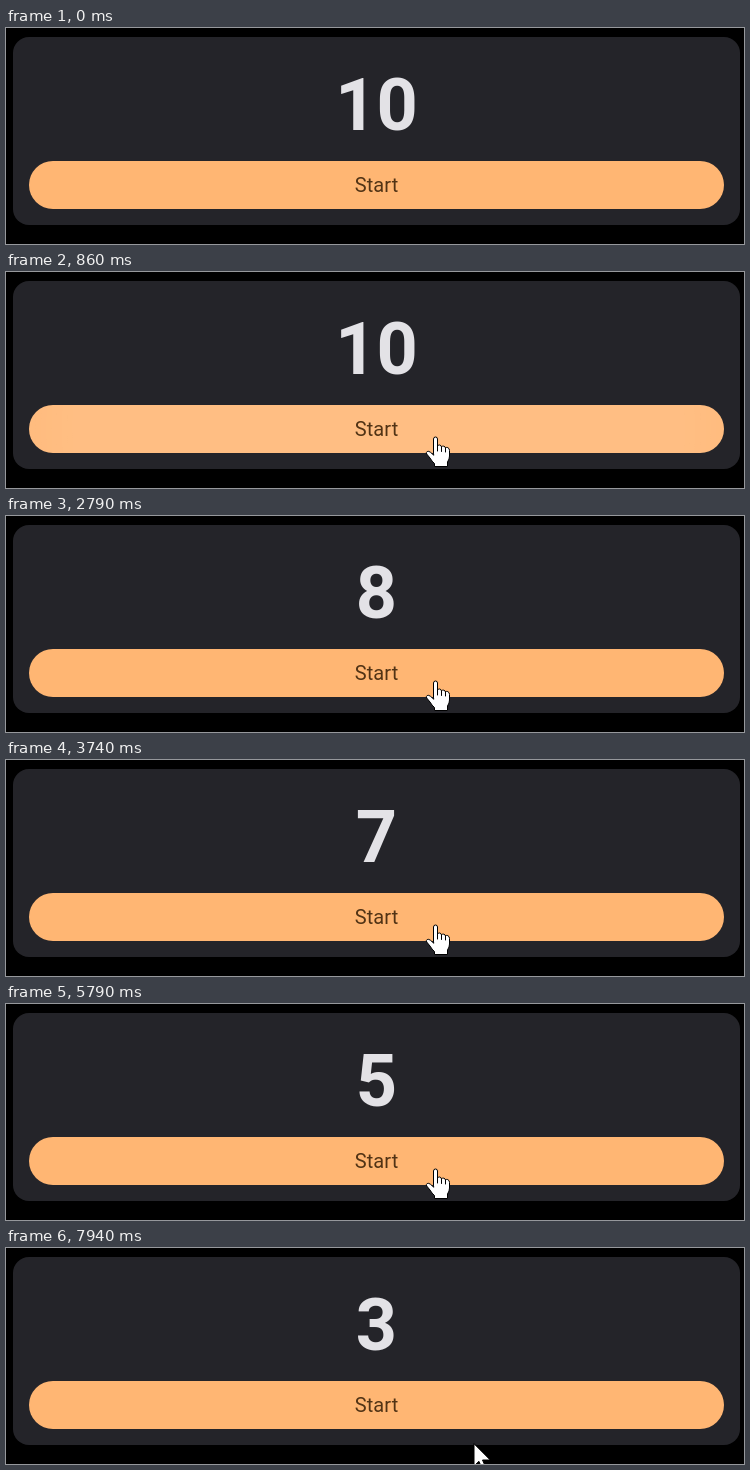
Write an HTML page that moves like this. It is 738x216 px and loops after 8000 ms.

```html
<!DOCTYPE html>
<html lang="en">
<head>
<meta charset="utf-8">
<title>Countdown</title>
<style>
  html, body { margin: 0; width: 100%; height: 100%; overflow: hidden; background: #000; }
  .stage { position: relative; width: 738px; height: 216px; overflow: hidden; font-family: Roboto, sans-serif; }
  .stage * { box-sizing: border-box; }
  .card { position: absolute; left: 7px; top: 9px; width: 727px; height: 188px; border-radius: 16px; background: #242429; }

  .count { position: absolute; left: 270.5px; top: 38px; width: 200px; height: 80px; overflow: hidden; }
  .digits { font-size: 72px; font-weight: 700; line-height: 80px; text-align: center; color: #e3e2e6; animation: count 8s step-end infinite; }
  .digits div { height: 80px; }

  .button { position: absolute; left: 23px; top: 133px; width: 695px; height: 48px; border-radius: 24px; overflow: hidden; background: #ffb673; }
  .label { position: absolute; inset: 0; font-size: 20px; line-height: 48px; letter-spacing: .1px; text-align: center; color: #513315; }
  .ripple {
    position: absolute; left: -127.5px; top: -451px; width: 950px; height: 950px; opacity: 0;
    background: radial-gradient(closest-side, #fff 65%, rgba(255, 255, 255, 0));
    animation: grow 8s linear infinite, fade 8s linear infinite;
  }

  svg { position: absolute; left: 0; top: 0; }
  .press { fill: #ffd93d; animation: press 8s step-end infinite; }
  .cursor { animation: move 8s step-end infinite; }
  .cursor path { fill: #fff; stroke: #000; stroke-linejoin: round; stroke-linecap: round; }
  .hand { animation: hand 8s step-end infinite; }
  .arrow { animation: arrow 8s step-end infinite; }

  @keyframes count {
    0% { transform: translateY(0); }
    22.5% { transform: translateY(-80px); }
    34.875% { transform: translateY(-160px); }
    46.75% { transform: translateY(-240px); }
    59.125% { transform: translateY(-320px); }
    72.375% { transform: translateY(-400px); }
    85% { transform: translateY(-480px); }
    96.625%, 100% { transform: translateY(-560px); }
  }
  @keyframes grow {
    0%, 6.5875% { transform: translate(58.5px, 7px) scale(.146); animation-timing-function: cubic-bezier(.2, 0, 0, 1); }
    12.2125%, 100% { transform: none; }
  }
  @keyframes fade {
    0%, 6.5875% { opacity: 0; }
    7.375%, 9.4% { opacity: .17; }
    14.0875%, 100% { opacity: 0; }
  }
  @keyframes press {
    0% { opacity: 0; }
    5.75% { opacity: 1; }
    8.25%, 100% { opacity: 0; }
  }
  @keyframes move {
    0% { transform: translate(780px, 260px); }
    .875% { transform: translate(533px, 200px); }
    1.75% { transform: translate(466px, 176px); }
    2.5% { transform: translate(429px, 165px); }
    97.5% { transform: translate(435px, 169px); }
    98.375% { transform: translate(452px, 184px); }
    99.25%, 100% { transform: translate(468px, 196px); }
  }
  @keyframes hand {
    0% { opacity: 0; }
    1.75% { opacity: 1; }
    98.375%, 100% { opacity: 0; }
  }
  @keyframes arrow {
    0% { opacity: 1; }
    1.75% { opacity: 0; }
    98.375%, 100% { opacity: 1; }
  }
</style>
</head>
<body>
<div class="stage">
  <div class="card"></div>
  <div class="count">
    <div class="digits">
      <div>10</div><div>9</div><div>8</div><div>7</div><div>6</div><div>5</div><div>4</div><div>3</div>
    </div>
  </div>
  <div class="button">
    <div class="ripple"></div>
    <div class="label">Start</div>
  </div>
  <svg width="738" height="216">
    <circle class="press" cx="429" cy="164.500" r="18"/>
    <g class="cursor">
      <g class="hand">
        <path d="M-1.500 16.500V2Q-1.500 0 .5 0T2.500 2V9Q3 7.800 4.700 8Q6.300 8.300 6.500 10Q7.300 8.800 8.800 9.200Q10.300 9.600 10.500 11Q11.500 10 12.800 10.600Q14.500 11.400 14.500 13.500V19Q14.500 22 12.500 25V29.500H-.5V26.500Q-3 24.500-5 21L-8.300 17Q-9.200 15.300-7.800 14.500Q-6.300 13.800-4.500 15.300L-1.500 18Z"/>
        <path d="M2.500 9V14M6.500 10V14.500M10.500 11V15"/>
      </g>
      <path class="arrow" d="M0 0V22L4.900 17.300L8.300 25L11.800 23.500L8.500 16H16Z"/>
    </g>
  </svg>
</div>
</body>
</html>
```
